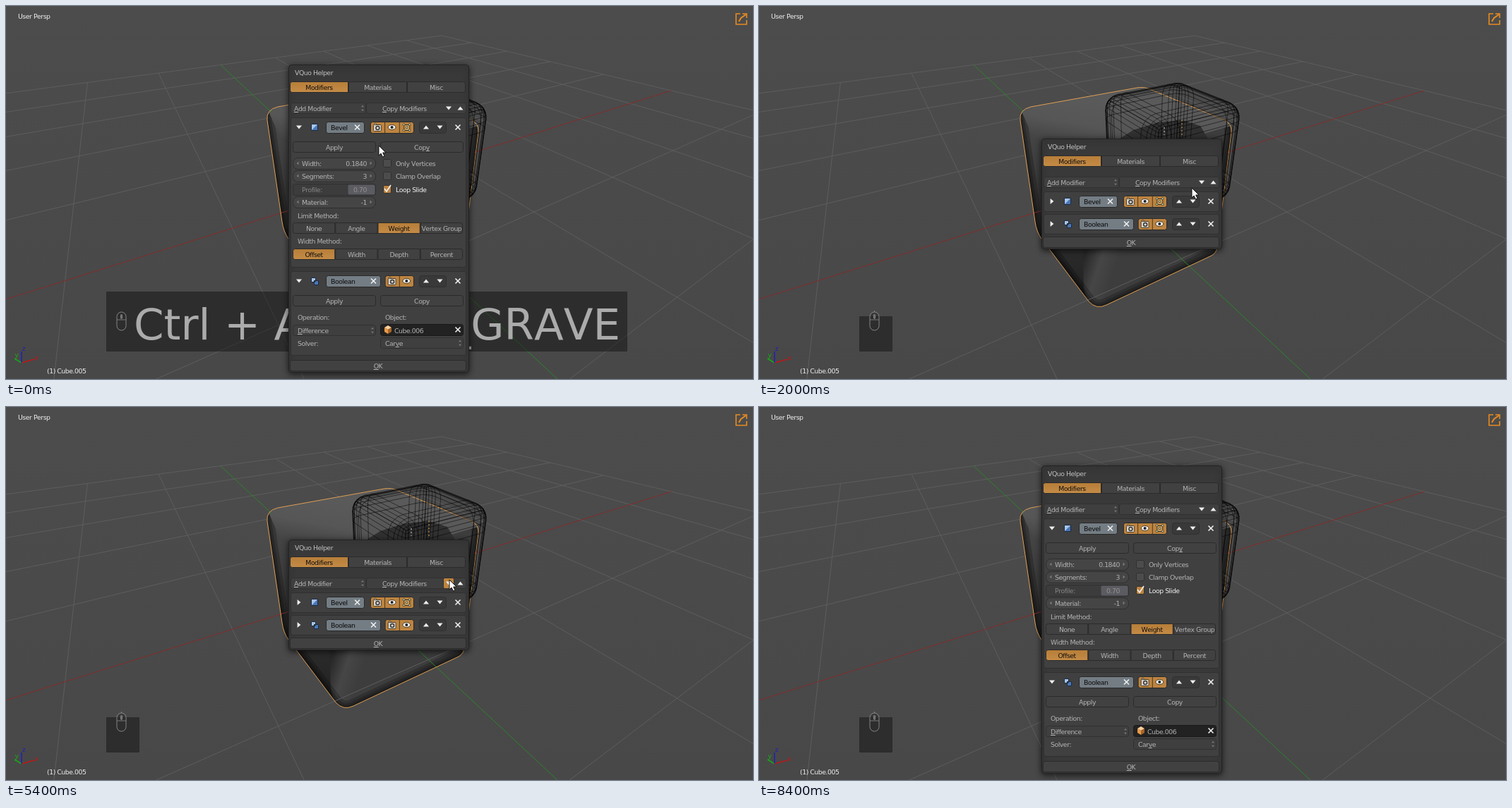
An HTML page with a canvas that plays this animation: 1058x529 px, repeating every 9 s.

```html
<!DOCTYPE html>
<html lang="en">
<head>
<meta charset="utf-8">
<title>Modifier helper panel</title>
<style>
html, body { margin: 0; width: 100%; height: 100%; overflow: hidden; background: #4b4b4b; }
canvas { display: block; width: 100vw; height: 100vh; }
</style>
</head>
<body>
<canvas id="stage" width="1058" height="529"></canvas>
<script>
const ctx = document.getElementById('stage').getContext('2d');
const W = 1058, H = 529, LOOP = 9000, STEP = 200;
const FONT = '"DejaVu Sans", sans-serif';
const ORANGE = '#bd8440', LIGHT = '#b4b4b4';
ctx.fontKerning = 'none';

// ---------- drawing helpers ----------
function path(points, closed) {
  ctx.beginPath();
  points.forEach(([x, y], i) => i ? ctx.lineTo(x, y) : ctx.moveTo(x, y));
  if (closed) ctx.closePath();
}
function poly(points, fill) { path(points, true); ctx.fillStyle = fill; ctx.fill(); }
function stroke(points, color, width = 1) {
  path(points);
  ctx.strokeStyle = color;
  ctx.lineWidth = width;
  ctx.stroke();
}
function gradient(x0, y0, x1, y1, ...colors) {
  const g = ctx.createLinearGradient(x0, y0, x1, y1);
  colors.forEach((c, i) => g.addColorStop(i / (colors.length - 1), c));
  return g;
}
function box(x0, y0, x1, y1, fill, border, radius = 3) {
  ctx.beginPath();
  ctx.roundRect(x0 + .5, y0 + .5, x1 - x0 - 1, y1 - y0 - 1, radius);
  ctx.fillStyle = fill;
  ctx.fill();
  if (border) { ctx.strokeStyle = border; ctx.lineWidth = 1; ctx.stroke(); }
}
function text(str, x, y, color = LIGHT, align = 'left', underline = -1) {
  ctx.font = '9.3px ' + FONT;
  ctx.letterSpacing = '-0.45px';
  ctx.fillStyle = color;
  const width = s => ctx.measureText(s).width;
  x -= width(str) * { left: 0, center: .5, right: 1 }[align];
  ctx.fillText(str, x, y + 3.5);
  if (underline >= 0)
    ctx.fillRect(x + width(str.slice(0, underline)), y + 5, width(str[underline]), 1);
}

// ---------- 3D view ----------
const COLUMNS = [[135.2, -7.52, .084], [19.2, -10.37, .1412], [-54.1, -120.8, -.1011]];
const ORIGIN = [493.8, 260.8, 1];
const CELL = 1.6, CELLS = 5;
const homogeneous = p => ORIGIN.map((o, i) => o + p.reduce((s, v, k) => s + v * COLUMNS[k][i], 0));
const flatten = ([x, y, w]) => [x / w, y / w];
const project = p => flatten(homogeneous(p));

function floorLine(from, to, color) {
  const a = homogeneous(from), b = homogeneous(to), near = .05;
  if (b[2] < near) return;
  const k = a[2] < near ? (near - a[2]) / (b[2] - a[2]) : 0;
  stroke([flatten(a.map((v, i) => v + (b[i] - v) * k)), flatten(b)], color);
}

function floor() {
  ctx.save();
  // The part of the cube above the floor hides the grid.
  path([[380, 238], [398, 264], [470, 347], [650, 292], [669, 172], [548, 114], [385, 143], [369, 156]], true);
  ctx.rect(0, 0, W, H);
  ctx.clip('evenodd');
  const end = CELL * CELLS;
  for (let i = -CELLS; i <= CELLS; i++) {
    if (!i) continue;
    floorLine([-end, i * CELL, 0], [end, i * CELL, 0], '#5d5d5d');
    floorLine([i * CELL, -end, 0], [i * CELL, end, 0], '#5d5d5d');
  }
  floorLine([-end, 0, 0], [end, 0, 0], '#842b2b');
  floorLine([0, -end, 0], [0, end, 0], '#2b842b');
  ctx.restore();
}

function cubeOutline() {
  ctx.beginPath();
  ctx.moveTo(370, 162);
  ctx.quadraticCurveTo(368, 147, 385, 143);
  ctx.lineTo(535, 116);
  ctx.quadraticCurveTo(546, 114, 556, 119);
  ctx.lineTo(660, 162);
  ctx.quadraticCurveTo(670, 167, 669, 180);
  ctx.lineTo(649, 342);
  ctx.quadraticCurveTo(648, 350, 641, 354);
  ctx.lineTo(492, 424);
  ctx.quadraticCurveTo(478, 431, 467, 419);
  ctx.lineTo(400, 330);
  ctx.quadraticCurveTo(393, 320, 391, 306);
  ctx.closePath();
}

function cube() {
  ctx.save();
  cubeOutline();
  ctx.clip();
  ctx.fillStyle = gradient(395, 150, 430, 400, '#4a4a4a', '#343434', '#242424');
  ctx.fillRect(360, 100, 320, 340);
  poly([[452, 190], [690, 160], [655, 365], [470, 440], [460, 400]],
    gradient(456, 370, 500, 385, '#272727', '#464646', '#3d3d3d'));
  ctx.strokeStyle = 'rgba(0,0,0,.22)';
  for (const width of [6, 12, 20]) {
    cubeOutline();
    ctx.lineWidth = width;
    ctx.stroke();
  }
  poly([[372, 150], [385, 141], [548, 110], [675, 168], [480, 225], [390, 190]],
    gradient(440, 128, 428, 200, '#5a5a5a', '#565656', '#404040'));
  poly([[505, 192], [530, 176], [565, 165], [600, 162], [625, 170], [637, 190]], '#303030');
  ctx.restore();
}

function wireCube() {
  const half = .69, round = .21, center = [.98, 0, .35];
  const inner = half - round;
  const marks = [0, .07, .14, .21, .33].flatMap(d => [half - d, d - half]);
  const samples = [...marks].sort((a, b) => a - b);
  const surface = q => {
    const core = q.map(v => Math.max(-inner, Math.min(inner, v)));
    const off = q.map((v, i) => v - core[i]);
    const len = Math.hypot(...off) || 1;
    return project(core.map((v, i) => center[i] + v + off[i] * round / len));
  };
  for (let axis = 0; axis < 3; axis++)
    for (const side of [-half, half])
      for (const turn of [1, 2])
        for (const mark of marks)
          stroke(samples.map(s => {
            const q = [0, 0, 0];
            q[axis] = side;
            q[(axis + turn) % 3] = mark;
            q[(axis + 3 - turn) % 3] = s;
            return surface(q);
          }), 'rgba(0,0,0,.8)', .65);
}

function gizmo() {
  [[40, 501, '#c01818', 'x', 43, 498], [12, 500, '#18a818', 'y', 15, 494], [22, 490, '#2020b8', 'z', 25, 485]]
    .forEach(([x, y, color, label, tx, ty]) => {
      stroke([[22, 506], [x, y]], color, 1.5);
      text(label, tx, ty, color, 'center');
    });
}

function viewport() {
  ctx.fillStyle = gradient(0, 0, 0, H, '#4c4c4c', '#484848');
  ctx.fillRect(0, 0, W, H);
  cube();
  floor();
  cubeOutline();
  ctx.strokeStyle = '#e0a056';
  ctx.lineWidth = 1;
  ctx.stroke();
  wireCube();
  ctx.setLineDash([2, 3]);
  stroke([[574, 172], [574, 183]], '#ddd');
  stroke([[599, 161], [599, 184]], '#dda050');
  ctx.setLineDash([]);
  text('User Persp', 17, 14, '#eee');
  text('(1) Cube.005', 58, 517, '#eee');
  gizmo();
  const o = '#e88b20';
  stroke([[1040, 11], [1034, 11], [1034, 26], [1049, 26], [1049, 20]], o, 1.6);
  stroke([[1043, 11], [1049, 11], [1049, 17]], o, 1.6);
  stroke([[1038, 22], [1041, 17], [1048, 12]], o, 2);
}

// ---------- key and mouse display ----------
function mouseIcon(cord) {
  ctx.beginPath();
  ctx.roundRect(157, 434, 13, 26, 6.5);
  ctx.fillStyle = 'rgba(45,45,45,.55)';
  ctx.fill();
  ctx.strokeStyle = '#858585';
  ctx.lineWidth = 1;
  ctx.stroke();
  stroke([[157, 445], [170, 445]], '#777');
  box(162, 437, 165, 444, '#666', '#858585', 1);
  if (cord) stroke([[163.5, 434], [163.5, 432]], '#858585');
}
function keyDisplay(t) {
  const fade = 1 - t / 1000;
  if (fade > 0) {
    box(142, 405, 880, 490, 'rgba(0,0,0,.38)', 'rgba(0,0,0,.25)', 0);
    ctx.letterSpacing = '0px';
    ctx.font = '61px ' + FONT;
    ctx.fillStyle = `rgba(225,225,225,${.7 * fade})`;
    ctx.fillText('Ctrl + ACCENT_GRAVE', 181, 472.5);
  } else {
    box(142, 440, 189, 490, 'rgba(0,0,0,.38)', 'rgba(0,0,0,.25)', 0);
  }
  mouseIcon(fade <= 0);
}

// ---------- panel widgets ----------
function button(label, x0, x1, y, { on = false, first = true, last = true, underline = -1 } = {}) {
  ctx.beginPath();
  ctx.roundRect(x0 + .5, y - 7.5, x1 - x0 - 1, 15, [first ? 3 : 0, last ? 3 : 0, last ? 3 : 0, first ? 3 : 0]);
  ctx.fillStyle = on ? gradient(0, y - 8, 0, y + 8, '#b67d38', '#c58c47') : '#414141';
  ctx.fill();
  ctx.strokeStyle = '#2b2b2b';
  ctx.lineWidth = 1;
  ctx.stroke();
  text(label, (x0 + x1) / 2, y, on ? '#101010' : LIGHT, 'center', underline);
}
function segmented(labels, x0, x1, y, active) {
  const w = (x1 - x0) / labels.length;
  labels.forEach((label, i) => button(label, x0 + i * w, x0 + (i + 1) * w, y,
    { on: i === active, first: !i, last: i === labels.length - 1 }));
}
function triangle(x, y, dir, size = 4, color = '#eee') {
  const a = size, b = size * .6;
  poly({
    up: [[x - a, y + b], [x, y - b], [x + a, y + b]],
    down: [[x - a, y - b], [x, y + b], [x + a, y - b]],
    right: [[x - b, y - a], [x + b, y], [x - b, y + a]],
    left: [[x + b, y - a], [x - b, y], [x + b, y + a]]
  }[dir], color);
}
function cross(x, y) {
  stroke([[x - 3.5, y - 3.5], [x + 3.5, y + 3.5]], '#f0f0f0', 1.6);
  stroke([[x - 3.5, y + 3.5], [x + 3.5, y - 3.5]], '#f0f0f0', 1.6);
}
function numberField(label, value, y, slider) {
  box(406, y - 8, 524, y + 9, slider ? '#3c3c3c' : '#454545', '#2e2e2e', slider ? 3 : 7);
  if (slider) box(484, y - 7, 523, y + 8, '#5b5b62', null, 2);
  else { triangle(413, y, 'left', 2.5, '#777'); triangle(517, y, 'right', 2.5, '#777'); }
  text(label, 419, y, slider ? '#858585' : LIGHT);
  text(value, 511, y, slider ? '#949494' : LIGHT, 'right');
}
function menu(label, x0, x1, y, underline) {
  box(x0, y - 8, x1, y + 8, '#3f3f3f', '#313131');
  text(label, x0 + (x0 === 403 ? 5 : 7), y, LIGHT, 'left', underline);
  triangle(x1 - 5, y - 3, 'up', 2, '#777');
  triangle(x1 - 5, y + 3, 'down', 2, '#777');
}
function checkbox(label, y, on) {
  box(534, y - 6, 546, y + 6, on ? ORANGE : '#4c4c4c', '#303030', 2);
  if (on) stroke([[536, y - 1], [539, y + 3], [545, y - 6]], '#eee', 1.6);
  text(label, 552, y, on ? '#f0f0f0' : LIGHT);
}

const icons = {
  camera(x, y) {
    box(x - 6, y - 4, x + 6, y + 6, '#d8d4cc', '#4a3a24', 1);
    box(x - 5, y - 6, x - 1, y - 3, '#ccc', '#4a3a24', 1);
    ctx.beginPath();
    ctx.arc(x + .5, y + 1, 2.5, 0, 7);
    ctx.strokeStyle = '#333';
    ctx.lineWidth = 1.4;
    ctx.stroke();
  },
  eye(x, y) {
    ctx.beginPath();
    ctx.ellipse(x, y, 5.5, 3.5, 0, 0, 7);
    ctx.fillStyle = '#eee';
    ctx.fill();
    ctx.strokeStyle = '#4a3518';
    ctx.lineWidth = 1;
    ctx.stroke();
    ctx.beginPath();
    ctx.arc(x, y, 2, 0, 7);
    ctx.fillStyle = '#222';
    ctx.fill();
  },
  mesh(x, y) {
    box(x - 4, y - 4, x + 5, y + 5, '#d0a060', '#403018', 1);
    for (const [dx, dy] of [[-4, -4], [4, -4], [-4, 4], [4, 4], [0, 0]])
      box(x + dx - 1.5, y + dy - 1.5, x + dx + 2, y + dy + 2, '#eee', '#553', 0);
  },
  bevel(x, y) {
    box(x - 5, y - 5, x + 5, y + 5, '#4a78b8', '#1c2c44', 0);
    poly([[x - 4, y - 4], [x + 4, y - 4], [x - 4, y + 4]], '#a8c4e8');
  },
  boolean(x, y) {
    box(x - 5, y - 5, x + 2, y + 2, '#a8c4e8', '#1c2c44', 0);
    box(x - 1, y - 1, x + 6, y + 6, '#4a78b8', '#1c2c44', 0);
    box(x - 1, y - 1, x + 2, y + 2, '#222', null, 0);
  },
  cube(x, y) {
    poly([[x, y - 6], [x + 5, y - 3], [x, y], [x - 5, y - 3]], '#ffd09a');
    poly([[x - 5, y - 3], [x, y], [x, y + 6], [x - 5, y + 3]], '#e89a48');
    poly([[x + 5, y - 3], [x, y], [x, y + 6], [x + 5, y + 3]], '#a86428');
  }
};

function modifierHeader(name, y, fieldEnd, toggles, open) {
  triangle(415, y, open ? 'down' : 'right');
  icons[name.toLowerCase()](437, y);
  box(453, y - 8, fieldEnd, y + 9, '#747d84', '#292929');
  text(name, 460, y + .5, '#0b0b0b');
  cross(fieldEnd - 10.5, y);
  const x0 = 578 - toggles.length * 20.7;
  box(x0, y - 8, 578, y + 9, ORANGE, '#292929');
  toggles.forEach((icon, i) => {
    if (i) stroke([[x0 + i * 20.7, y - 7], [x0 + i * 20.7, y + 8]], '#4a3820');
    icons[icon](x0 + 10 + i * 20.7, y);
  });
  box(585, y - 8, 624, y + 9, '#393939', '#303030');
  triangle(595, y, 'up');
  triangle(614.5, y, 'down');
  cross(640, y);
}

function bevelSettings() {
  button('Apply', 406, 524, 200);
  button('Copy', 530, 648, 200, { underline: 3 });
  numberField('Width:', '0.1840', 223);
  numberField('Segments:', '3', 241);
  numberField('Profile:', '0.70', 260, true);
  numberField('Material:', '-1', 278);
  checkbox('Only Vertices', 223);
  checkbox('Clamp Overlap', 241);
  checkbox('Loop Slide', 260, true);
  text('Limit Method:', 413, 297);
  segmented(['None', 'Angle', 'Weight', 'Vertex Group'], 406, 647, 315, 2);
  text('Width Method:', 413, 333.5);
  segmented(['Offset', 'Width', 'Depth', 'Percent'], 406, 647, 352, 0);
}
function booleanSettings() {
  button('Apply', 406, 524, 418);
  button('Copy', 530, 648, 418);
  text('Operation:', 413, 441);
  menu('Difference', 406, 524, 460, 0);
  text('Object:', 537, 441);
  box(530, 451, 648, 468, '#222', '#191919');
  icons.cube(541, 459);
  text('Cube.006', 550, 460);
  cross(640, 459);
  text('Solver:', 413, 478);
  menu('Carve', 530, 648, 478, 3);
}

function panel(open, cursor, pressed) {
  const top = open ? 83 : 188, bottom = open ? 519 : 344;
  ctx.save();
  ctx.shadowColor = 'rgba(0,0,0,.65)';
  ctx.shadowBlur = 9;
  ctx.shadowOffsetY = 2;
  box(400, top, 656, bottom + 1, '#393939', '#232323', 4);
  ctx.restore();
  text('VQuo Helper', 409, top + 11.5, '#c0c0c0');
  segmented(['Modifiers', 'Materials', 'Misc'], 402, 651, top + 32, 0);

  const barY = top + 62;
  menu('Add Modifier', 403, 510, barY, 0);
  box(510, barY - 8, 652, barY + 8, '#3f3f3f', '#313131');
  text('Copy Modifiers', 533, barY, LIGHT, 'left', 0);
  [[627, 'down'], [643.5, 'up']].forEach(([x, dir]) => {
    const hover = cursor && Math.abs(cursor[0] - x) < 8 && Math.abs(cursor[1] - barY) < 8;
    if (hover) box(x - 8, barY - 8, x + 8, barY + 8, pressed ? ORANGE : '#505050', '#313131', 2);
    triangle(x, barY, dir);
  });

  const bevelY = top + 89, booleanY = open ? 390 : 309;
  box(403, bevelY - 14, 652, open ? 371 : bevelY + 15, '#404040', '#303030');
  box(403, booleanY - 14, 652, open ? 496 : booleanY + 15, '#404040', '#303030');
  modifierHeader('Bevel', bevelY, 508, ['camera', 'eye', 'mesh'], open);
  modifierHeader('Boolean', booleanY, 531, ['camera', 'eye'], open);
  if (open) { bevelSettings(); booleanSettings(); }
  button('OK', 402, 652, bottom - 9, { underline: 0 });
}

// ---------- motion ----------
const UP = [645, 144], DOWN = [628, 245];
const moves = [
  [0, 528, 198], [1200, ...UP], [1600, ...UP], [2000, 613, 258], [2400, ...DOWN], [3000, ...DOWN],
  [3200, 632, 245], [4000, ...UP], [4400, ...UP], [5200, ...DOWN], [5600, ...DOWN],
  [6200, ...UP], [6800, ...UP], [7400, ...DOWN], [8200, ...DOWN]
];
const presses = [1400, 3000, 4200, 5400, 6600, 7800];

function cursorAt(t) {
  if (t >= 8400) return null;
  const i = moves.findIndex(m => m[0] > t);
  if (i < 0) return DOWN;
  const [t0, x0, y0] = moves[i - 1], [t1, x1, y1] = moves[i];
  const k = (t - t0) / (t1 - t0), ease = k * k * (3 - 2 * k);
  return [x0 + (x1 - x0) * ease, y0 + (y1 - y0) * ease];
}
function drawCursor([x, y]) {
  const shape = [[0, 0], [0, 14], [3, 11], [5.5, 16], [8, 15], [5.7, 10], [10, 10]].map(([a, b]) => [x + a, y + b]);
  poly(shape, '#fff');
  ctx.strokeStyle = '#111';
  ctx.lineWidth = 1;
  ctx.stroke();
}

function draw(t) {
  const cursor = cursorAt(t);
  const toggles = presses.filter(p => t >= p + STEP).length;
  viewport();
  keyDisplay(t);
  panel(toggles % 2 === 0, cursor, presses.includes(t));
  if (cursor) drawCursor(cursor);
}

const start = performance.now();
let shown = -1;
function tick() {
  const t = Math.floor((performance.now() - start) % LOOP / STEP) * STEP;
  if (t !== shown) draw(shown = t);
  requestAnimationFrame(tick);
}
tick();
</script>
</body>
</html>
```
